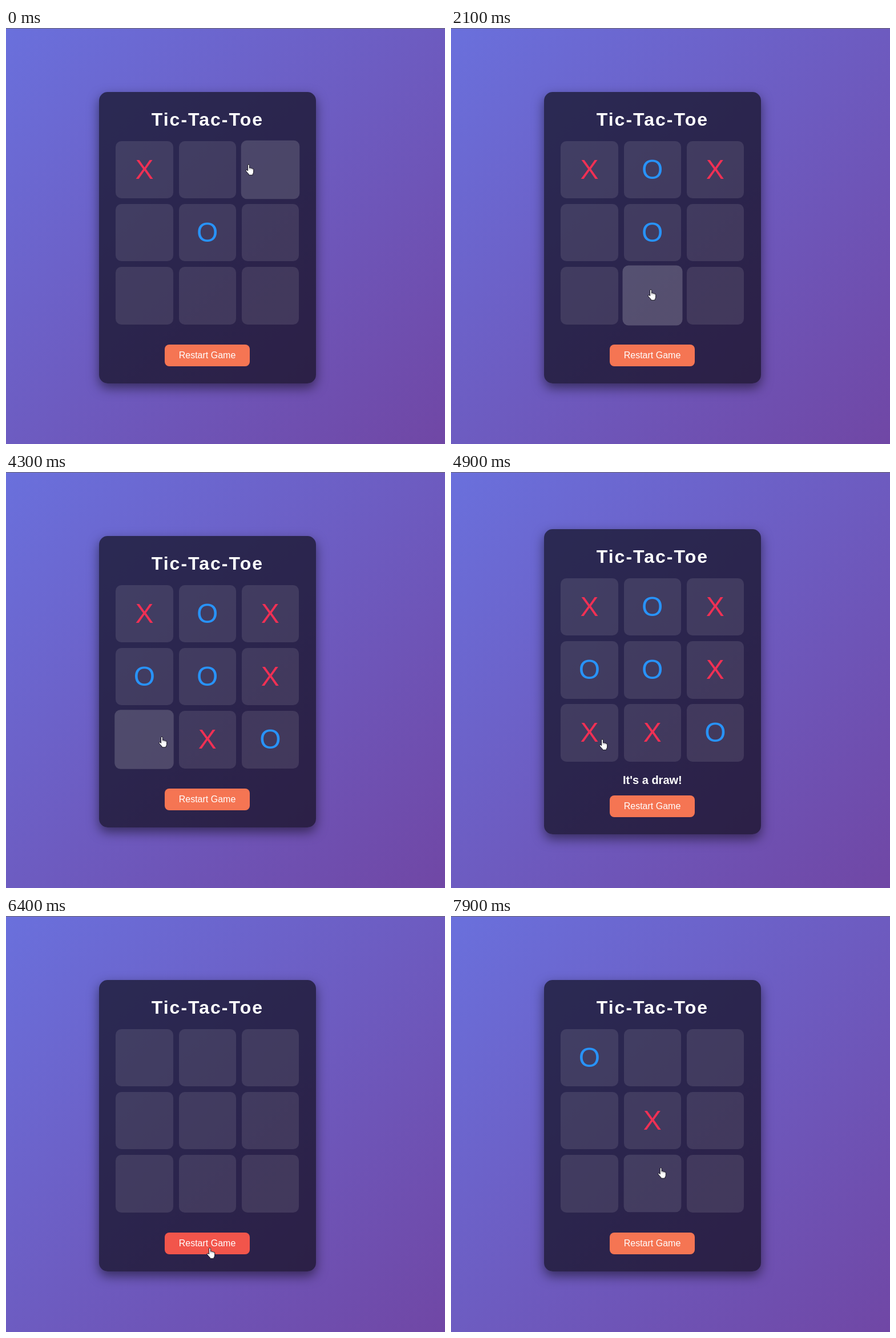
An HTML page that plays this animation: 769 by 728 pixels, repeating every 8 s.

```html
<!DOCTYPE html>
<html lang="en">
<head>
<meta charset="utf-8">
<title>Tic-Tac-Toe</title>
<style>
html, body { margin: 0; width: 100%; height: 100%; overflow: hidden; }
body {
  position: relative;
  background: linear-gradient(135deg, #6a70dc, #7047a5);
  font-family: Arial, "Liberation Sans", sans-serif;
  color: #fff;
}
body > *, .cell, #card > * { position: absolute; }
#bar { inset: 0 0 auto; height: 1px; background: #6c6870; }
#card {
  left: 162.7px; width: 380.4px;
  border-radius: 15px;
  background: rgba(0, 0, 0, .6);
  box-shadow: 0 8px 20px rgba(0, 0, 0, .5);
}
h1, #message { left: 0; width: 100%; margin: 0; text-align: center; font-weight: bold; }
h1 { top: 30px; font-size: 32px; line-height: 37px; letter-spacing: 2px; }
.cell {
  width: 100.3px; height: 100.3px;
  border-radius: 10px;
  font-size: 48px; line-height: 100px; text-align: center;
}
#message { top: 427px; font-size: 20px; line-height: 24px; }
#restart {
  left: 115.3px; bottom: 30px; width: 149px; height: 38px;
  border-radius: 8px;
  font-size: 16px; line-height: 38px; text-align: center;
}
#hand { left: -10px; top: -11px; width: 20px; height: 22px; }
</style>
</head>
<body>
<div id="bar"></div>
<div id="card">
  <h1>Tic-Tac-Toe</h1>
  <div id="message">It's a draw!</div>
  <div id="restart">Restart Game</div>
</div>
<svg id="hand" viewBox="-10 -11 20 22">
  <path fill="#fff" stroke="#15131f" stroke-width="1" stroke-linejoin="round"
    d="M-3.4 2V-7.7q0-1.5 1.4-1.5t1.4 1.5V-3q2.4-.8 2.6.6 2.2-.6 2.5.7 2.2-.4 2.2 1.6V4q0 2-1.5 3.6V9.3H-1.7V7.8Q-4 5.600-6.600 2.300-7.400.8-6 .2-4.800 0-3.400 2Z"/>
  <path fill="none" stroke="#77737f" stroke-width=".7" d="M-.6-3V0M2-2.400V.3M4.500-1.700V.6"/>
</svg>
<script>
const LOOP = 8000, STEP = 100, FADE = 200;
const DRAW = 4600, RESET = 6400;
const $ = id => document.getElementById(id);
const mix = (a, b, p) => a + (b - a) * p;
const clamp = p => Math.min(1, Math.max(0, p));
const easeOut = p => 1 - (1 - p) ** 2;
const smooth = p => p * p * (3 - 2 * p);

// cell, symbol, time placed
const moves = [
  [0, 'X', 0], [4, 'O', 0], [2, 'X', 540], [1, 'O', 1040], [7, 'X', 2200],
  [3, 'O', 2700], [5, 'X', 3400], [8, 'O', 3900], [6, 'X', DRAW],
  [4, 'X', 7200], [0, 'O', 7700]
];
// cell, time entered, time left or taken
const hovers = [
  [2, -60, 540], [7, 1700, 2200], [5, 2870, 3400], [6, 4210, DRAW],
  [7, 6740, 6935], [4, 6955, 7200], [7, 7885, LOOP]
];
// time, x, y
const path = [
  [0, 427, 248], [600, 432, 247], [1150, 432, 247], [1950, 352, 467],
  [2500, 352, 467], [3150, 451, 372], [3600, 451, 372], [4400, 267, 477],
  [5000, 267, 477], [5700, 359, 590], [6500, 359, 590], [7150, 362, 360],
  [7600, 362, 362], [LOOP, 371, 466]
];

const cells = Array.from({ length: 9 }, (_, i) => {
  const cell = document.createElement('div');
  cell.className = 'cell';
  cell.style.left = 29.7 + i % 3 * 110.15 + 'px';
  cell.style.top = 85.9 + Math.floor(i / 3) * 110.15 + 'px';
  return $('card').appendChild(cell);
});

const hoverAmount = (t, start, end) =>
  t < start ? 0 : easeOut(clamp((t - start) / FADE)) * (1 - easeOut(clamp((t - end) / FADE)));

function render(t) {
  const drawn = t >= DRAW && t < RESET;
  $('card').style.top = (drawn ? 100.3 : 112.1) + 'px';
  $('card').style.height = (drawn ? 533.6 : 510) + 'px';
  $('message').style.visibility = drawn ? 'visible' : 'hidden';

  cells.forEach((cell, i) => {
    const mark = moves.find(([c, , at]) => c === i && t >= at && (at >= RESET) === (t >= RESET));
    cell.textContent = mark ? mark[1] : '';
    cell.style.color = mark && mark[1] === 'X' ? '#f03054' : '#2893fa';
    const glow = Math.max(...hovers.map(([c, a, b]) => c === i ? hoverAmount(t, a, b) : 0));
    cell.style.background = `rgba(255, 255, 255, ${mix(.1, .2, glow)})`;
    cell.style.transform = glow ? `scale(${1 + .05 * glow})` : 'none';
  });

  const hot = hoverAmount(t, 5490, 6660);
  $('restart').style.background =
    `rgb(${mix(245, 242, hot)}, ${mix(117, 85, hot)}, ${mix(83, 75, hot)})`;

  const next = path.findIndex(([at]) => at > t);
  const [t0, x0, y0] = path[next - 1], [t1, x1, y1] = path[next];
  const p = smooth((t - t0) / (t1 - t0));
  $('hand').style.transform = `translate(${mix(x0, x1, p)}px, ${mix(y0, y1, p)}px)`;
}

const start = performance.now();
function tick() {
  const t = (performance.now() - start) % LOOP;
  render(Math.floor(t / STEP) * STEP);
  requestAnimationFrame(tick);
}
tick();
</script>
</body>
</html>
```
